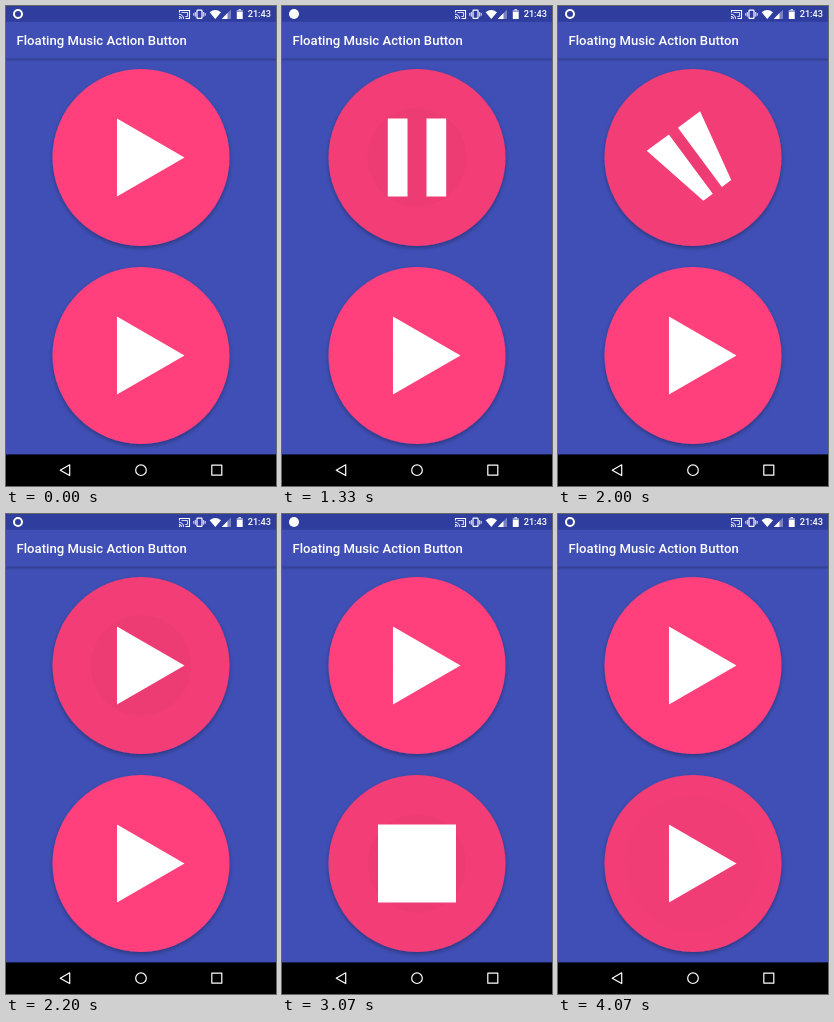
Write an HTML page that moves like this. It is 270x480 px and loops after 4140 ms.

```html
<!DOCTYPE html>
<html lang="en">
<head>
<meta charset="utf-8">
<title>Floating Music Action Button</title>
<style>
  html, body { margin: 0; width: 100%; height: 100%; overflow: hidden; background: #3f4fb5; }
  svg { display: block; width: 100vw; height: 100vh; }
  text { font-family: Roboto, "Noto Sans", sans-serif; font-weight: 500; fill: #fff; }
</style>
</head>
<body>
<svg viewBox="0 0 270 480">
  <defs>
    <linearGradient id="barShade" x2="0" y2="1">
      <stop offset="0" stop-color="#000" stop-opacity=".22"/>
      <stop offset="1" stop-color="#000" stop-opacity="0"/>
    </linearGradient>
    <filter id="lift" x="-10%" y="-10%" width="120%" height="120%">
      <feDropShadow dx="0" dy="2" stdDeviation="2" flood-color="#000" flood-opacity=".32"/>
    </filter>
    <clipPath id="disc"><circle r="88.5"/></clipPath>
  </defs>

  <rect width="270" height="480" fill="#3f4fb5"/>
  <rect width="270" height="15.8" fill="#2f3e9e"/>
  <rect y="52.5" width="270" height="3.5" fill="url(#barShade)"/>
  <text x="10.5" y="38.8" font-size="13.14">Floating Music Action Button</text>

  <!-- status bar -->
  <circle id="dot" cx="12" cy="8"/>
  <g fill="none" stroke="#fff">
    <path d="M173.5 6.5V4.5H183.500V12.500H179.500" stroke-width="1.100"/>
    <path d="M173 8.200A4.600 4.600 0 0 1 177.600 12.800M173 10.300A2.500 2.500 0 0 1 175.500 12.800"/>
    <path d="M175.500 6.500H181.500V10.500H179.300" stroke-width=".8"/>
    <rect x="191" y="4.200" width="5" height="8.200" rx=".6" stroke-width="1.200"/>
    <path d="M189.300 6V10.700M197.700 6V10.700M187.800 7V9.700M199.200 7V9.700" stroke-width=".9"/>
  </g>
  <g fill="#fff">
    <circle cx="173.600" cy="12.300" r=".8"/>
    <path d="M203.600 6.200Q209.300 1.800 215 6.200L209.300 13Z"/>
    <path d="M225 3.500V13H215.800Z" opacity=".35"/>
    <path d="M221.500 7.100V13H215.800Z"/>
    <path d="M232.500 3.300h2.500v1h1.700v8.700h-5.900v-8.700h1.700Z"/>
  </g>
  <path d="M230.800 4.300h5.900v1.700h-5.900Z" fill="#2f3e9e" opacity=".5"/>
  <text x="265" y="11.400" font-size="9.200" text-anchor="end">21:43</text>

  <g id="buttons"></g>

  <!-- navigation bar -->
  <rect y="448.400" width="270" height="31.600" fill="#000"/>
  <g fill="none" stroke="#fff" stroke-width="1.200" stroke-linejoin="round">
    <path d="M54.200 464.200L63.700 458.800V469.600Z"/>
    <circle cx="135" cy="464.200" r="5.300"/>
    <rect x="205.800" y="459.200" width="10" height="10"/>
  </g>
</svg>
<script>
const LOOP = 4140, STEP = 200 / 3, LAST = 61;
const MORPH = 300, SIDE = 78;
const PAUSE = { inner: 9.5, outer: 29.2 };
const STOP = { inner: 0, outer: SIDE / 2 };

const clamp = x => Math.min(1, Math.max(0, x));
const lerp = (a, b, k) => a + (b - a) * k;
const ramp = (t, from, to) => clamp((t - from) / (to - from));
const ease = k => (1 - Math.cos(Math.PI * k)) / 2;

function node(parent, tag, attrs) {
  const el = document.createElementNS("http://www.w3.org/2000/svg", tag);
  set(el, attrs);
  return parent.appendChild(el);
}

function set(el, attrs) {
  for (const name in attrs) el.setAttribute(name, attrs[name]);
}

function makeButton(cy, rest, taps) {
  const g = node(document.getElementById("buttons"), "g", { transform: `translate(135 ${cy})` });
  node(g, "circle", { r: 88.5, fill: "#ff3f7c", filter: "url(#lift)" });
  const shade = node(g, "circle", { r: 88.5, fill: "#000" });
  const ripple = node(g, "circle", { fill: "#000", "clip-path": "url(#disc)" });
  const icon = node(g, "path", { fill: "#fff" });
  return { rest, taps, shade, ripple, icon };
}

// play = 0 gives the resting bars, play = 1 the triangle; the tip lies on +x
function iconPath(rest, play) {
  const half = SIDE * lerp(1, Math.sqrt(3) / 2, play) / 2;
  const mid = SIDE / 8 * play;
  const inner = lerp(rest.inner, 0, play);
  const base = lerp(rest.outer, SIDE / 2, play);
  const tip = lerp(rest.outer, 0, play);
  const a = mid - half, b = mid + half;
  const bar = s => `M${a} ${s * inner}L${a} ${s * base}L${b} ${s * tip}L${b} ${s * inner}Z`;
  return bar(-1) + bar(1);
}

function drawButton({ rest, taps, shade, ripple, icon }, t) {
  const [open, close] = taps.map(tap => ease(ramp(t, tap, tap + MORPH)));
  const play = 1 - open + close;
  set(icon, { d: iconPath(rest, play), transform: `rotate(${90 * (1 - play)})` });

  const age = t - (t < taps[1] - 70 ? taps[0] : taps[1]);
  const fade = 1 - ramp(age, 430, 660);
  const grow = ramp(age, 0, 500);
  set(shade, { opacity: 0.05 * ramp(age, -70, 110) * fade });
  set(ripple, {
    r: lerp(20, 88.5, grow * grow),
    opacity: age > 0 ? 0.02 * (1 - ramp(age, 320, 480)) : 0
  });
}

const dot = document.getElementById("dot");
const buttons = [
  makeButton(151.5, PAUSE, [1005, 1868]),
  makeButton(349.5, STOP, [2740, 3646])
];

function draw(now) {
  const t = Math.min(LAST, Math.floor((now % LOOP + 5) / STEP)) * STEP;
  const solid = Math.floor((t + 1400) / 1000) % 2 === 0 && t >= 590;
  set(dot, solid
    ? { r: 5, fill: "#fff", stroke: "none" }
    : { r: 4, fill: "none", stroke: "#fff", "stroke-width": 2 });
  buttons.forEach(b => drawButton(b, t));
}

function tick() {
  draw(performance.now());
  requestAnimationFrame(tick);
}
tick();
</script>
</body>
</html>
```
